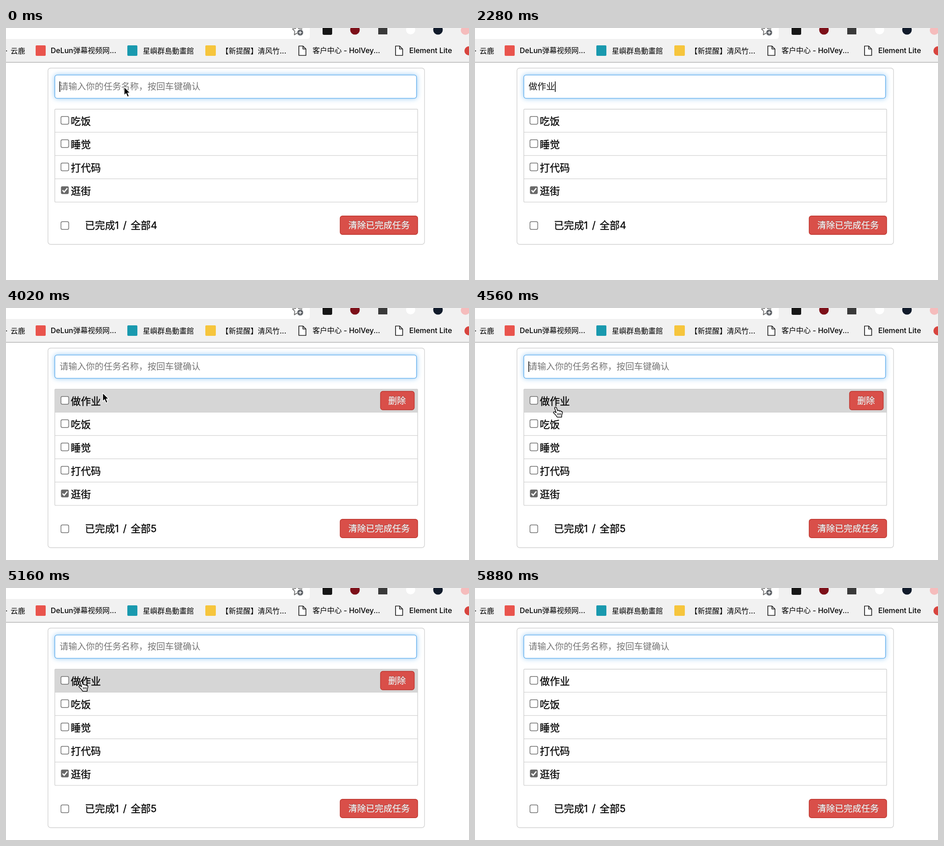
These frames come from a looping animation (1015 by 552 pixels, 5.94 s). An HTML page:

```html
<!DOCTYPE html>
<html lang="zh-CN">
<head>
<meta charset="utf-8">
<title>任务清单</title>
<style>
html, body { margin: 0; width: 100%; height: 100%; overflow: hidden; background: #fff; }
svg { display: block; }
text { font: 22px Inter, "Noto Sans CJK SC", "Noto Sans CJK", sans-serif; white-space: pre; }
.bar text { font-size: 16px; font-weight: 500; }
#list text { stroke: #000; stroke-width: .3; }
.line { fill: none; stroke: #d2d2d2; stroke-width: 1.4; }
.btn { fill: #d94f49; stroke: #bd362f; stroke-width: 1.4; }
#list text.label { font-size: 19.25px; fill: #fff; stroke: #fff; text-shadow: 0 -1px 0 #0004; }
text.field { font-family: "Liberation Sans", "Noto Sans CJK SC", "Noto Sans CJK", sans-serif; font-size: 19.3px; }
text.num { font-size: 17px; fill: #858585; }
text.pick { fill: #fff; }
.popup { filter: drop-shadow(0 4px 7px #0005) drop-shadow(0 3px 12px #0001); }
.glow { filter: drop-shadow(0 0 6px #52a8ec99); }
</style>
</head>
<body>
<svg width="1015" height="552" viewBox="0 0 1015 552">
  <g class="bar">
    <path fill="#f1f1f1" d="M0 0H1015V75H0z"/>
    <path fill="#fff" d="M0 0H666V18Q666 24 660 24H0z"/>
    <path stroke="#b4b4b4" stroke-width="1.4" d="M0 75.3H1015"/>
    <path fill="none" stroke="#666" stroke-width="1.6" stroke-linejoin="round" d="M638 -6l3 7 8 1-6 5 2 8-7-4-6 4 1-8-5-5 7-1z"/>
    <circle cx="645" cy="10" r="7" fill="#5f6368" stroke="#fff"/>
    <path stroke="#fff" stroke-width="1.5" d="M641.5 10h7M645 6.5v7"/>
    <rect x="694" y="-6" width="21" height="21" rx="3" fill="#161616"/>
    <circle cx="765" cy="4" r="10.5" fill="#7d1019"/>
    <rect x="816" y="-6" width="20" height="20" fill="#3a3a3a"/>
    <circle cx="887" cy="4" r="10" fill="#fff"/>
    <circle cx="947" cy="4" r="10.5" fill="#111b2b"/>
    <circle cx="1007" cy="5" r="10" fill="#f5bcbc"/>
    <rect x="65" y="38" width="22" height="23" rx="2" fill="#e9544d"/>
    <rect x="266" y="38" width="22" height="23" rx="2" fill="#1999ae"/>
    <rect x="437" y="38" width="23" height="23" rx="2" fill="#f6c53c"/>
    <circle cx="1015" cy="50" r="10" fill="#d8443e"/>
    <g fill="#fff" stroke="#222" stroke-width="1.7" stroke-linejoin="round">
      <path id="doc" d="M642 39.5h9l6.5 6.5v14h-15.5zM651 39.5v6.5h6.5"/>
      <use href="#doc" x="212"/>
    </g>
    <text x="-4" y="55">-</text>
    <text x="10" y="55.5">云鹿</text>
    <text x="98" y="55">DeLun弹幕视频网...</text>
    <text x="300" y="55.5">星嶼群島動畫館</text>
    <text x="472" y="55.5">【新提醒】清风竹...</text>
    <text x="672" y="55">客户中心 - HolVey...</text>
    <text x="884" y="55">Element Lite</text>
  </g>
  <g id="list"></g>
  <rect class="glow" x="107" y="103" width="793" height="51" rx="5" fill="#fff" stroke="#72b7ef" stroke-width="1.6"/>
  <text class="field" id="field" x="117.5" y="135"></text>
  <path id="underline" stroke="#222" stroke-width="1.3"/>
  <path id="caret" stroke="#000" stroke-width="1.6"/>
  <g id="popup" class="popup"></g>
  <g id="cursor"></g>
</svg>
<script>
const LOOP = 5940, STEP = 60, COMMIT = 2100, ADDED = 2940;
const $ = id => document.getElementById(id);
const text = (x, y, s, cls = '') => `<text x="${x}" y="${y}" class="${cls}">${s}</text>`;
const rect = (x, y, w, h, rx, attrs) =>
  `<rect x="${x}" y="${y}" width="${w}" height="${h}" rx="${rx}" ${attrs}/>`;

// Time of each key, text being composed, candidates offered
const keys = [
  [480, 'z', '在 再 这 最 怎么 早 自己 组'],
  [600, 'zu', '组 足 族 租 祖 卒 阻 足够'],
  [720, 'zuo', '做 坐 作 座 左 佐 昨 琢'],
  [900, 'zuo z', '做着 坐着 做 坐 作 座 左 佐'],
  [1080, 'zuo zu', '做足 做足了 做 坐 作 座 左 佐'],
  [1260, 'zuo zuo', '做作 做做 坐坐 做 坐 作 座 左'],
  [1500, 'zuo zuo y', '做作业 做作 做 坐 作 座 左 佐'],
  [1680, 'zuo zuo ye', '做作业 做作 做 坐 作 座 左 佐']
];

// Pointer path: time, x, y
const path = [
  [3660, 259, 128], [4020, 212, 186], [4320, 180, 219], [4560, 177, 217],
  [4740, 177, 217], [5160, 165, 204], [5340, 165, 204], [5700, 196, 562]
];
const arrow = `<path fill="#000" stroke="#fff" stroke-width="1.4" stroke-linejoin="round"
  d="M0 0V18.5L4.2 14.6L7.3 22L10.8 20.5L7.7 13.3H13.3z"/>`;
const hand = `<path fill="#fff" stroke="#000" stroke-width="1.5" stroke-linejoin="round"
  d="M-2.5 2Q-1 -1.5 1.5 1L4 8Q7 6 8 9Q11 7 12 10Q15 9 14.5 13L13 18V22H3Q1 18 -5 12.5Q-5 9.5 -2 10.5L1 12.5z"/>
  <path stroke="#000" stroke-width="1.2" d="M4.5 13v5M7.5 13v5M10.5 13v5"/>`;

function checkbox(y, on) {
  const box = rect(120.5, y - 8.5, 17, 17, 3, on ? 'fill="#696969"' : 'fill="#fff" stroke="#707070" stroke-width="1.5"');
  return box + (on ? `<path fill="none" stroke="#fff" stroke-width="2.6" d="M124 ${y}l3.5 4 7-8.5"/>` : '');
}

function button(x, y, w, label, tx) {
  return rect(x, y, w, 40.5, 5, 'class="btn"') + text(tx, y + 27.5, label, 'label');
}

function drawList(tasks, hover) {
  const bottom = 178 + 51 * tasks.length;
  let out = rect(92, 87.7, 825.5, bottom + 4.3, 6, 'class="line"');
  tasks.forEach((task, i) => {
    const y = 178 + 51 * i;
    if (i === hover) out += rect(107, y - 1, 795.5, 51.5, 2, 'fill="#d6d6d6"') + button(821, y + 4.5, 74, '删除', 838);
    else if (i) out += `<path class="line" d="M107 ${y - .6}H902"/>`;
    out += checkbox(y + 24.3, task === '逛街') + text(142, y + 33.5, task);
  });
  const y = bottom + 50.7;
  return out + rect(107, 177.7, 795.5, bottom - 178.3, 2, 'class="line"') + checkbox(y, false)
    + text(173, y + 7.5, '已完成') + text(238.5, y + 7.5, '1') + text(256.5, y + 7.5, '/')
    + text(273.3, y + 7.5, '全部' + tasks.length) + button(732.5, y - 21, 170, '清除已完成任务', 750.5);
}

function drawPopup(words) {
  let x = 103, items = '';
  words.split(' ').forEach((word, i) => {
    const w = 22 * word.length, cls = i ? '' : 'pick';
    if (!i) items += rect(99, 151.5, w + 26.5, 36, 6, 'fill="#0758d6"');
    items += text(x, 176, i + 1, 'num ' + cls)
      + `<text x="${x + 13.7}" y="177" fill="#3d3d3d" class="${cls}">${word}</text>`;
    x += w + 34.2;
  });
  const end = x - 21;
  return rect(95, 148, end - 38, 43.5, 11, 'fill="#fcfcfc" stroke="#bbb" stroke-width=".7"') + items
    + `<path fill="none" stroke="#777" stroke-width="2" d="M${end + 27} 166.500l7 7 7-7"/>`;
}

function pointer(t) {
  if (t < 480) return [259, 129];
  const i = path.findIndex(p => p[0] > t);
  if (i < 1) return null;
  const [t0, x0, y0] = path[i - 1], [t1, x1, y1] = path[i];
  const k = (t - t0) / (t1 - t0), e = k * k * (3 - 2 * k);
  return [x0 + (x1 - x0) * e, y0 + (y1 - y0) * e];
}

function caretOn(t) {
  if (t < 480) return t < 240;
  if (t < COMMIT) return true;
  const since = t - (t < ADDED ? COMMIT : 2955);
  return since < 0 || since % 1170 < 585;
}

function draw(t) {
  const tasks = ['吃饭', '睡觉', '打代码', '逛街'];
  if (t >= ADDED) tasks.unshift('做作业');
  const key = t < COMMIT && keys.filter(k => k[0] <= t).pop();
  const typed = key ? key[1] : t >= COMMIT && t < ADDED ? '做作业' : '';
  const pos = pointer(t);
  const row = pos ? Math.floor((pos[1] - 178) / 51) : -1;

  $('list').innerHTML = drawList(tasks, row);
  const field = $('field');
  field.textContent = typed || '请输入你的任务名称，按回车键确认';
  field.setAttribute('fill', typed ? '#111' : '#757575');
  const end = 117.5 + (typed ? field.getComputedTextLength() : 0);
  $('underline').setAttribute('d', key ? `M118 138.5H${end}` : '');
  $('caret').setAttribute('d', caretOn(t) ? `M${end + .5} 117V140` : '');
  $('popup').innerHTML = key ? drawPopup(key[2]) : '';

  let cursor = '';
  if (pos) {
    const onLabel = tasks[row] && pos[0] > 120 && pos[0] < 142 + 22 * tasks[row].length;
    cursor = `<g transform="translate(${pos})">${onLabel ? hand : arrow}</g>`;
  }
  $('cursor').innerHTML = cursor;
}

let start, shown;
function tick(now) {
  start ??= now;
  const t = Math.floor((now - start) % LOOP / STEP) * STEP;
  if (t !== shown) draw(shown = t);
  requestAnimationFrame(tick);
}
draw(0);
requestAnimationFrame(tick);
</script>
</body>
</html>
```
